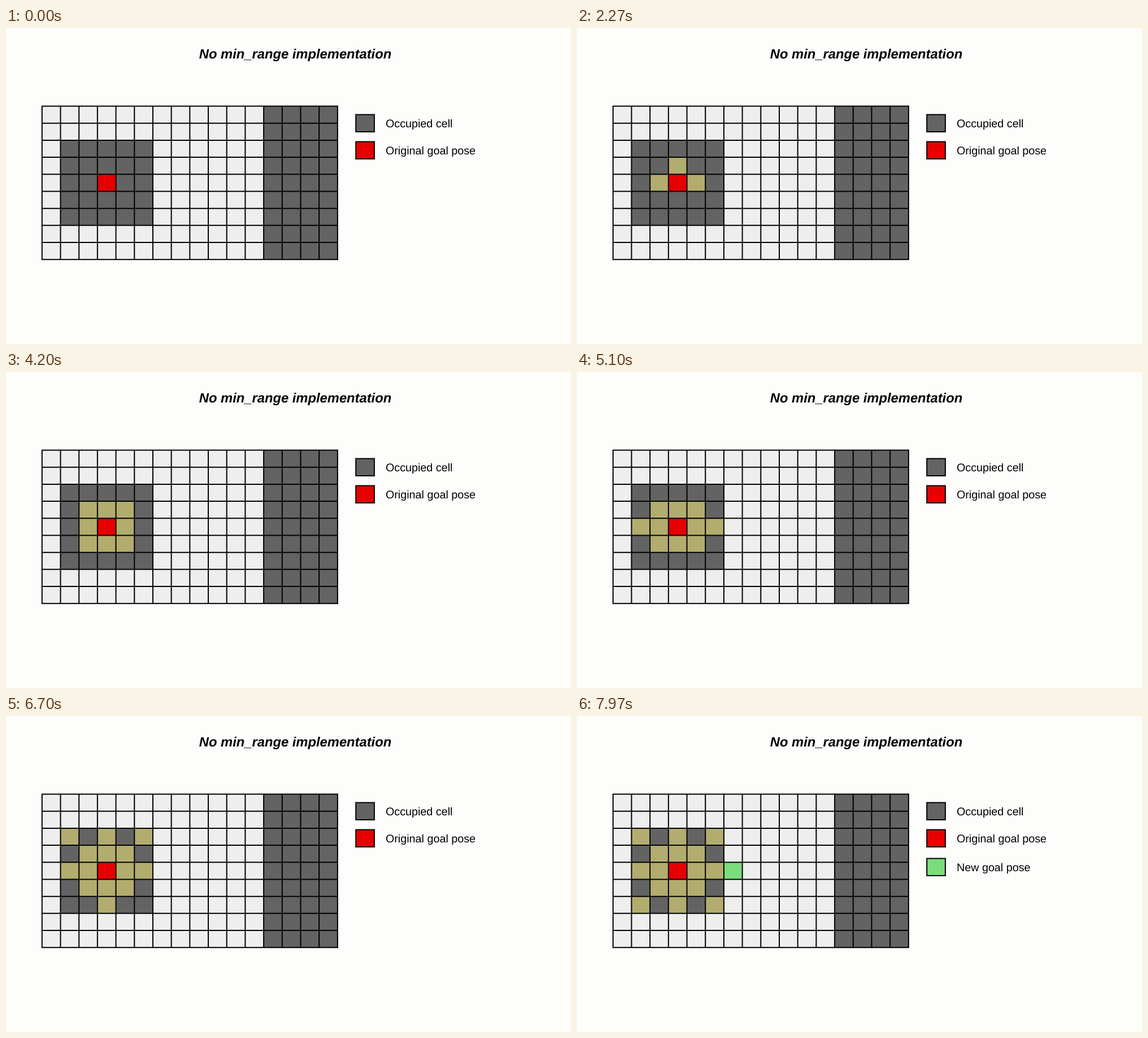
Animation, 1000 px wide and 560 px high, one loop 8 s. Source, as an HTML page with a canvas:

```html
<!DOCTYPE html>
<html lang="en">
<head>
<meta charset="utf-8">
<title>Goal search on an occupancy grid</title>
<style>
  html, body { margin: 0; width: 100%; height: 100%; overflow: hidden; background: #fdfdfc; }
  canvas { display: block; }
</style>
</head>
<body>
<canvas id="stage" width="1000" height="560"></canvas>
<script>
const ctx = document.getElementById('stage').getContext('2d');
ctx.textRendering = 'geometricPrecision';

const LOOP = 8000, FIRST = 1430, STEP = 395;
const COLS = 16, ROWS = 9;
const LEFT = 63.8, TOP = 138.5, CELL_W = 32.69, CELL_H = 30.19;
const FREE = '#eeeeee', OCCUPIED = '#636363', GOAL = '#e60000';
const VISITED = '#b2ad6e', NEW_GOAL = '#7add7d';
const goal = { col: 3, row: 4 };

// Search order around the goal: axes first, then diagonals, ring by ring.
const directions = [[1, 0], [-1, 0], [0, -1], [0, 1], [-1, -1], [1, -1], [-1, 1], [1, 1]];
const visits = [1, 2].flatMap(radius => directions.map(([dx, dy]) =>
  ({ col: goal.col + dx * radius, row: goal.row + dy * radius })));

function fillCell({ col, row }, color) {
  ctx.fillStyle = color;
  ctx.fillRect(LEFT + col * CELL_W, TOP + row * CELL_H, CELL_W, CELL_H);
}

function fillBlock(col, row, cols, rows, color) {
  ctx.fillStyle = color;
  ctx.fillRect(LEFT + col * CELL_W, TOP + row * CELL_H, cols * CELL_W, rows * CELL_H);
}

function drawGridLines() {
  const right = LEFT + COLS * CELL_W, bottom = TOP + ROWS * CELL_H;
  ctx.beginPath();
  for (let col = 0; col <= COLS; col++) {
    const x = LEFT + col * CELL_W;
    ctx.moveTo(x, TOP - 1);
    ctx.lineTo(x, bottom + 1);
  }
  for (let row = 0; row <= ROWS; row++) {
    const y = TOP + row * CELL_H;
    ctx.moveTo(LEFT, y);
    ctx.lineTo(right, y);
  }
  ctx.stroke();
}

function drawLegend(y, color, label) {
  ctx.fillStyle = color;
  ctx.fillRect(619.2, y, 32.7, 30.4);
  ctx.strokeRect(619.2, y, 32.7, 30.4);
  ctx.fillStyle = '#000';
  ctx.font = '19.75px "Liberation Sans", Arial, sans-serif';
  ctx.textAlign = 'left';
  ctx.fillText(label, 671.9, y + 22);
}

function draw(time) {
  const count = Math.floor((time - FIRST) / STEP) + 1;
  const found = count > visits.length;

  ctx.fillStyle = '#fdfdfc';
  ctx.fillRect(0, 0, 1000, 560);
  ctx.strokeStyle = '#000';
  ctx.lineWidth = 2;

  ctx.fillStyle = '#000';
  ctx.font = 'italic bold 23.75px "Liberation Sans", Arial, sans-serif';
  ctx.textAlign = 'center';
  ctx.fillText('No min_range implementation', 512, 54.3);

  fillBlock(0, 0, COLS, ROWS, FREE);
  fillBlock(1, 2, 5, 5, OCCUPIED);
  fillBlock(12, 0, 4, ROWS, OCCUPIED);
  visits.slice(0, Math.max(0, count)).forEach(cell => fillCell(cell, VISITED));
  fillCell(goal, GOAL);
  if (found) fillCell({ col: goal.col + 3, row: goal.row }, NEW_GOAL);
  drawGridLines();

  drawLegend(153.5, OCCUPIED, 'Occupied cell');
  drawLegend(201.5, GOAL, 'Original goal pose');
  if (found) drawLegend(252.5, NEW_GOAL, 'New goal pose');
}

const start = performance.now();
function tick() {
  draw((performance.now() - start) % LOOP);
  requestAnimationFrame(tick);
}
tick();
</script>
</body>
</html>
```
